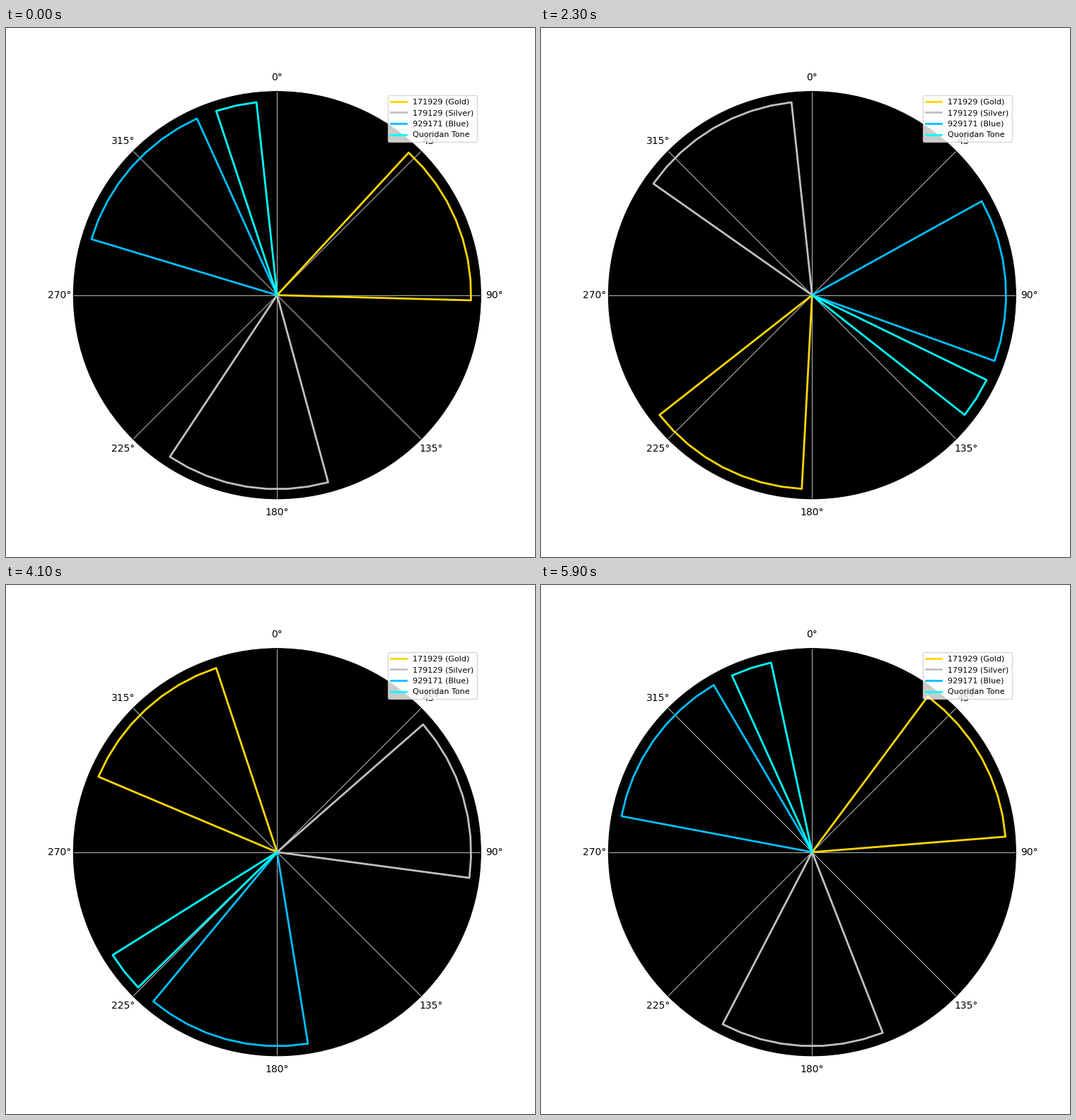
A matplotlib script that plays this animation: 748 px wide and 748 px high, repeating every 6 s.

```python
import numpy as np
import matplotlib.pyplot as plt
from matplotlib.animation import FuncAnimation

STEPS = 60
INTERVAL = 100

# label, colour, first step of the sector, number of steps it spans
SECTORS = [
    ("171929 (Gold)", "gold", 7, 9),
    ("179129 (Silver)", "silver", 27, 9),
    ("929171 (Blue)", "deepskyblue", 47, 9),
    ("Quoridan Tone", "cyan", 56, 3),
]

plt.rcParams["font.family"] = "DejaVu Sans"

theta = np.linspace(0, 2 * np.pi, STEPS)


def pulse(start, width):
    """Radius per step: 1 inside the sector, 0 elsewhere."""
    radius = np.zeros(STEPS)
    radius[start:start + width] = 1
    return radius


fig, ax = plt.subplots(figsize=(7.48, 7.48), dpi=100,
                       subplot_kw={"projection": "polar"})
ax.set_facecolor("black")
ax.set_theta_zero_location("N")
ax.set_theta_direction(-1)
ax.set_yticks([])

pulses = [pulse(start, width) for _, _, start, width in SECTORS]
lines = [ax.plot(theta, radius, color=color, lw=2, label=label)[0]
         for radius, (label, color, _, _) in zip(pulses, SECTORS)]
ax.set_ylim(0, 1.05)
ax.legend(loc="upper right", fontsize=8)


def update(frame):
    for line, radius in zip(lines, pulses):
        line.set_data(theta, np.roll(radius, frame))
    return lines


anim = FuncAnimation(fig, update, frames=STEPS, interval=INTERVAL,
                     repeat=True, repeat_delay=0)
plt.show()
```
